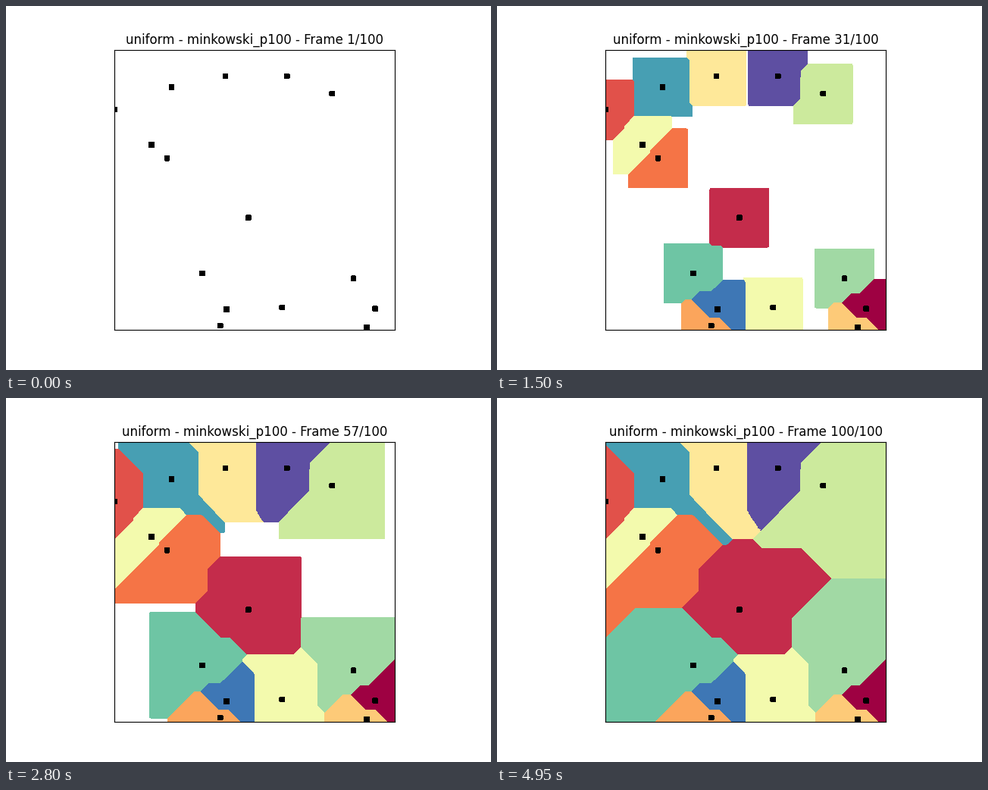
Recreate the animation shown at these times as a matplotlib script. Size 640 by 480 pixels, loop 5000 ms.

```python
import numpy as np
import matplotlib.pyplot as plt
from matplotlib.animation import FuncAnimation
from matplotlib.colors import to_rgb

W, H, DPI = 640, 480, 100
FRAMES, INTERVAL = 100, 50
P = 100
DOT = 3.7

# Square plot area in stage pixels, y pointing down
LEFT, TOP, SIDE = 143.2, 57.6, 369.6

# Seed positions, ordered along the colour map
SEEDS = [
    (487.2, 399.2), (319.8, 279.2), (143.2, 137.7), (212.4, 200.8),
    (282.8, 421.3), (476.0, 423.5), (289.5, 93.4), (192.0, 183.1),
    (364.2, 397.6), (430.2, 116.3), (458.3, 359.2), (259.1, 352.4),
    (218.4, 108.1), (291.0, 399.9), (370.8, 93.4),
]


def minkowski(dx, dy):
    return (np.abs(dx) ** P + np.abs(dy) ** P) ** (1 / P)


# One sample per stage pixel
x0, x1, y0, y1 = 143, 513, 57, 428
gx, gy = np.meshgrid(np.arange(x0, x1) + 0.5, np.arange(y0, y1) + 0.5)
dists = np.array([minkowski(gx - sx, gy - sy) for sx, sy in SEEDS])
owner = dists.argmin(axis=0)
nearest = dists.min(axis=0)

palette = plt.get_cmap("Spectral")(np.linspace(0, 1, len(SEEDS)))[:, :3]
palette[7:9] = to_rgb("#f3faad")
cells = palette[owner]
cells[nearest <= DOT] = 0
radii = np.linspace(DOT, nearest.max(), FRAMES)


def grown(i):
    """Cells filled out to the current radius, white beyond it."""
    return np.where((nearest <= radii[i])[..., None], cells, 1.0)


fig = plt.figure(figsize=(W / DPI, H / DPI), dpi=DPI, facecolor="white")
ax = fig.add_axes([LEFT / W, 1 - (TOP + SIDE) / H, SIDE / W, SIDE / H])
image = ax.imshow(grown(0), extent=(x0, x1, y1, y0), aspect="auto",
                  interpolation="nearest")
ax.set(xlim=(LEFT, LEFT + SIDE), ylim=(TOP + SIDE, TOP), xticks=[], yticks=[])
title = ax.set_title("", fontsize=12, fontfamily="DejaVu Sans")


def update(i):
    image.set_data(grown(i))
    title.set_text(f"uniform - minkowski_p{P} - Frame {i + 1}/{FRAMES}")
    return image, title


anim = FuncAnimation(fig, update, frames=FRAMES, interval=INTERVAL,
                     repeat=True, repeat_delay=0, blit=False)
plt.show()
```
